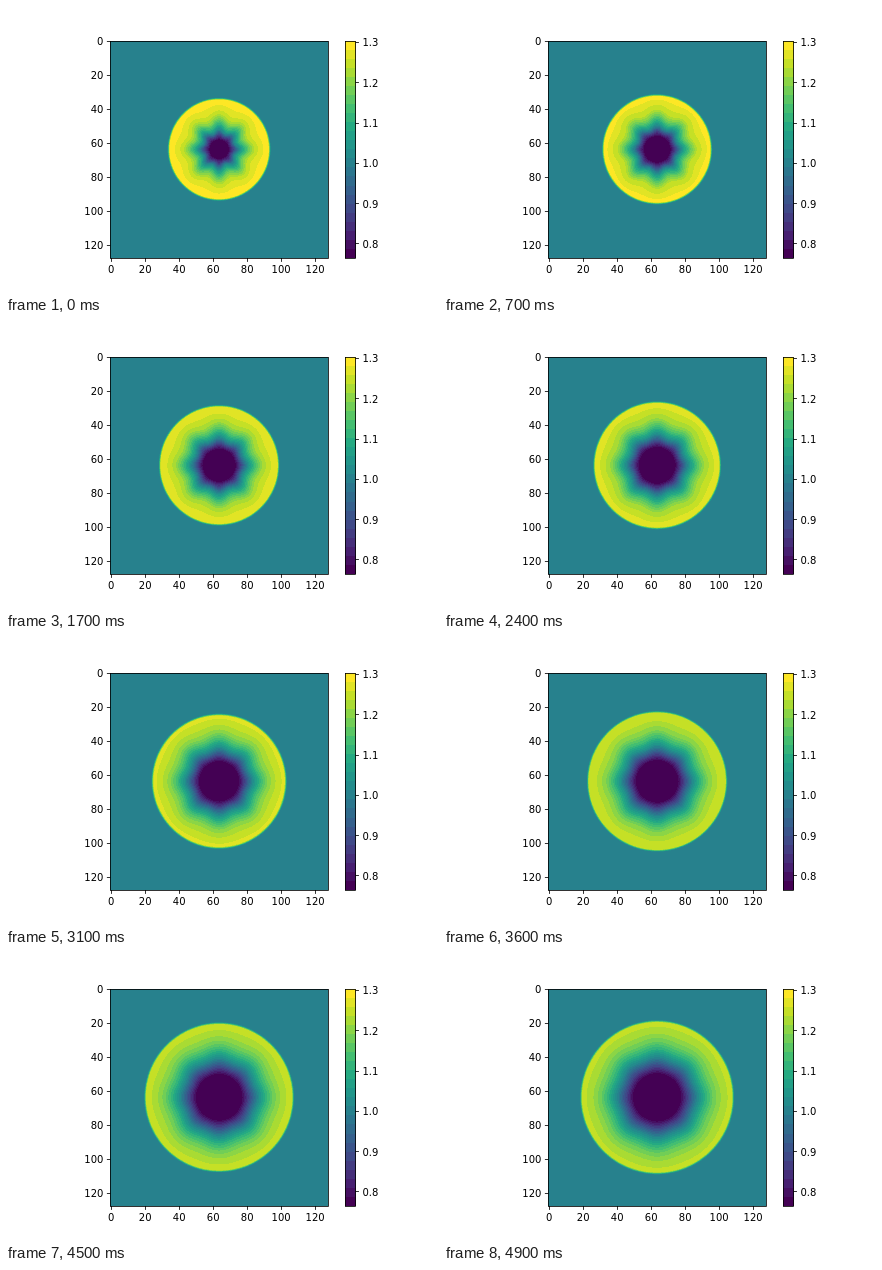
Animation, 432 px wide and 288 px high, one loop 5000 ms. Source, as an HTML page with a canvas:

```html
<!DOCTYPE html>
<html lang="en">
<head>
<meta charset="utf-8">
<title>Expanding wave</title>
<style>
html, body { margin: 0; width: 100%; height: 100%; overflow: hidden; background: #fff; }
canvas { display: block; width: 432px; height: 288px; }
</style>
</head>
<body>
<canvas id="stage" width="432" height="288"></canvas>
<script>
const ctx = document.getElementById('stage').getContext('2d');
const LOOP = 5000, STEP = 100, FRAMES = LOOP / STEP;
const LEVELS = 24, LOW = 0.765, HIGH = 1.305;
const plot = { x: 104.4, y: 34.56, size: 217.44 };
const bar = { x: 338.58, w: 10.87 };
const cx = plot.x + plot.size / 2, cy = plot.y + plot.size / 2;

const viridis = ['440154', '482475', '414487', '355f8d', '2a788e', '21918c',
  '22a884', '44bf70', '7ad151', 'bddf26', 'fde725']
  .map(h => [0, 2, 4].map(i => parseInt(h.slice(i, i + 2), 16)));

// Radial profile at the start and end, from the core (0) to the front (1)
const knots = [0, 0.1, 0.2, 0.3, 0.45, 0.6, 0.75, 0.9, 1];
const early = [0.77, 0.87, 1, 1.09, 1.185, 1.25, 1.272, 1.295, 1.3];
const late = [0.77, 0.85, 0.93, 1.01, 1.105, 1.175, 1.215, 1.24, 1.245];

const clamp = (v, a, b) => Math.max(a, Math.min(b, v));
const mix = (a, b, k) => a + (b - a) * k;

function sample(xs, ys, x) {
  let i = 0;
  while (i < xs.length - 2 && x > xs[i + 1]) i++;
  return mix(ys[i], ys[i + 1], clamp((x - xs[i]) / (xs[i + 1] - xs[i]), 0, 1));
}

const palette = Array.from({ length: LEVELS }, (_, n) => {
  const k = n / (LEVELS - 1) * 10, i = Math.min(9, Math.floor(k));
  return viridis[i].map((c, j) => Math.round(mix(c, viridis[i + 1][j], k - i)));
});
const colour = v =>
  palette[clamp(Math.floor((v - LOW) / (HIGH - LOW) * LEVELS), 0, LEVELS - 1)];
const css = c => `rgb(${c})`;

const left = 104, top0 = 35, side = 218;
const image = ctx.createImageData(side, 217);
const polar = [];
for (let j = 0; j < image.height; j++) {
  for (let i = 0; i < side; i++) {
    const x = left + i + 0.5 - cx, y = top0 + j + 0.5 - cy;
    polar.push([Math.hypot(x, y), Math.cos(8 * Math.atan2(y, x))]);
  }
}

function drawField(frame) {
  const p = frame / (FRAMES - 1);
  const front = 50.6 + 25.6 * p;
  const core = 9 + 14 * Math.pow(p, 0.7);
  const lobe = 2.6 - 1.5 * p;
  const profile = early.map((v, i) => mix(v, late[i], p));
  polar.forEach(([r, wave], n) => {
    let v = 1;
    if (r < front + 1.5) {
      const u = (r - core) / (front - core);
      const bump = Math.sin(Math.PI * clamp(u, 0, 1));
      const bent = u - lobe * wave * bump / (front - core);
      v = bent < 0 ? LOW : sample(knots, profile, bent);
      const k = clamp((front + 1.5 - r) / 3, 0, 1);
      v = 1 + (v - 1) * k * k * (3 - 2 * k);
    }
    const c = colour(v);
    image.data.set(c, n * 4);
    image.data[n * 4 + 3] = 255;
  });
  ctx.putImageData(image, left, top0);
}

function line(x1, y1, x2, y2) {
  ctx.beginPath();
  ctx.moveTo(x1, y1);
  ctx.lineTo(x2, y2);
  ctx.stroke();
}

function label(text, x, y, align) {
  ctx.textAlign = align;
  ctx.fillText(text, x, y);
}

function drawAxes() {
  const base = plot.y + plot.size, cell = plot.size / 128;
  ctx.strokeStyle = ctx.fillStyle = '#000';
  ctx.lineWidth = 0.8;
  ctx.font = '10px "DejaVu Sans", sans-serif';
  ctx.strokeRect(104.5, 35.5, 218, 217);
  for (let v = 0; v <= 120; v += 20) {
    const d = (v + 0.5) * cell;
    const x = Math.floor(plot.x + d) + 0.5, y = Math.floor(plot.y + d) + 0.5;
    line(x, base, x, base + 3.9);
    line(plot.x - 3.5, y, plot.x, y);
    label(v, plot.x + d, base + 14.8, 'center');
    label(v, plot.x - 7, plot.y + d + 3.5, 'right');
  }
}

function drawBar() {
  const right = bar.x + bar.w, h = plot.size / LEVELS;
  palette.forEach((c, n) => {
    const y = Math.round(plot.y + plot.size - (n + 1) * h);
    ctx.fillStyle = css(c);
    ctx.fillRect(339, y, 11, Math.round(plot.y + plot.size - n * h) - y);
  });
  ctx.strokeStyle = ctx.fillStyle = '#000';
  ctx.strokeRect(339.5, 35.5, 10, 217);
  for (let n = 8; n <= 13; n++) {
    const v = n / 10;
    const y = plot.y + plot.size * (HIGH - v) / (HIGH - LOW);
    line(right, Math.floor(y) + 0.5, right + 3.5, Math.floor(y) + 0.5);
    label(v.toFixed(1), right + 7, y + 3.9, 'left');
  }
}

let shown = -1;
function draw(now) {
  const frame = Math.floor((now % LOOP) / STEP);
  if (frame !== shown) {
    shown = frame;
    ctx.fillStyle = '#fff';
    ctx.fillRect(0, 0, 432, 288);
    drawField(frame);
    drawAxes();
    drawBar();
  }
}

const start = performance.now();
function tick() {
  draw(performance.now() - start);
  requestAnimationFrame(tick);
}
tick();
</script>
</body>
</html>
```
